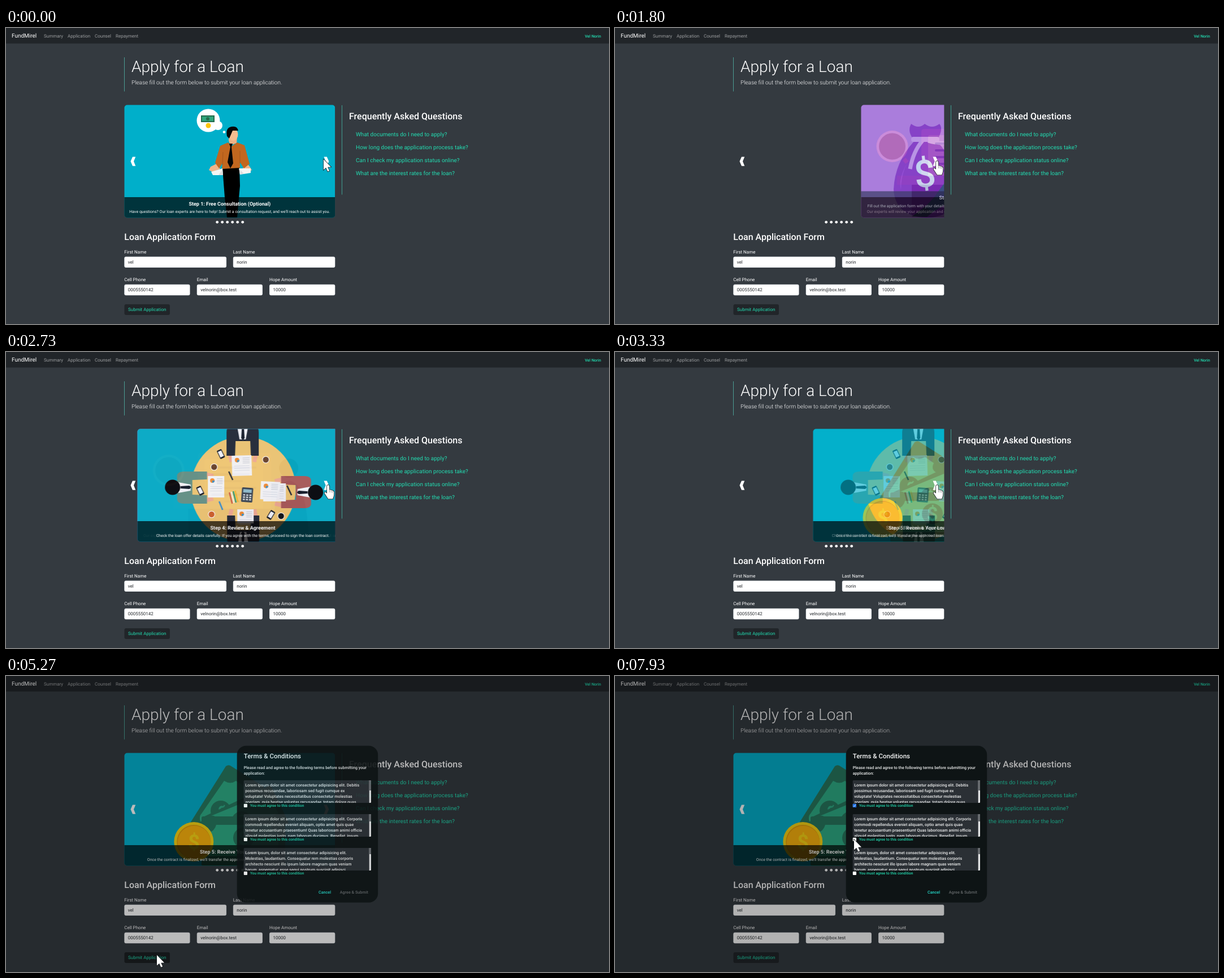
An HTML page with a canvas that plays this animation: 1067x525 px, repeating every 8 s.

```html
<!DOCTYPE html>
<html lang="en">
<head>
<meta charset="utf-8">
<title>Loan application</title>
<style>
html, body { margin: 0; width: 100%; height: 100%; overflow: hidden; background: #343a40; }
canvas { display: block; }
</style>
</head>
<body>
<canvas id="stage" width="1067" height="525"></canvas>
<script>
const W = 1067, H = 525, LOOP = 8000;
const TEAL = '#23dcb1', DARK = '#212529';
const SLIDE = { x: 209.5, y: 136.5, w: 372.8, h: 200, mid: 395.8 };
const screen = document.getElementById('stage').getContext('2d');
let g = screen;

// Drawing helpers, all on the current context g
function text(s, x, y, size, color = '#fff', weight = 400, align = 'left') {
  g.font = `${weight} ${size}px Roboto, sans-serif`;
  g.textAlign = align;
  g.fillStyle = color;
  g.fillText(s, x, y);
}
function box(color, x, y, w, h, r = 0) {
  g.fillStyle = color;
  g.beginPath();
  g.roundRect(x, y, w, h, r);
  g.fill();
}
function disc(color, x, y, r, ry = r) {
  g.fillStyle = color;
  g.beginPath();
  g.ellipse(x, y, r, ry, 0, 0, Math.PI * 2);
  g.fill();
}
function shape(color, d) {
  g.fillStyle = color;
  g.fill(new Path2D(d));
}
function stroke(color, width, d) {
  g.strokeStyle = color;
  g.lineWidth = width;
  g.stroke(new Path2D(d));
}
function at(x, y, turn, draw) {
  g.save();
  g.translate(x, y);
  g.rotate(turn);
  draw();
  g.restore();
}
function layer(draw) {
  const c = document.createElement('canvas');
  c.width = W;
  c.height = H;
  g = c.getContext('2d');
  g.textRendering = 'geometricPrecision';
  draw();
  g = screen;
  return c;
}

function field(label, value, x, y, w) {
  text(label, x, y, 8);
  box('#ced4da', x, y + 5.5, w, 19.5, 3);
  box('#fff', x + .5, y + 6, w - 1, 18.5, 2.5);
  text(value, x + 6.5, y + 18, 8, DARK);
}

function drawPage() {
  box('#343a40', 0, 0, W, H);
  box(DARK, 0, 0, W, 27.5);
  text('FundMirel', 10, 17, 10);
  [['Summary', 67], ['Application', 109], ['Counsel', 157], ['Repayment', 194]]
    .forEach(([s, x]) => text(s, x, 16.5, 8, '#9b9d9f'));
  text('Vel Norin', 1053, 16.5, 7, TEAL, 500, 'right');

  box('#4b9d92', 209, 52, 1, 60.5);
  text('Apply for a Loan', 222, 78.3, 28, '#fff', 300);
  text('Please fill out the form below to submit your loan application.', 222, 100, 10, '#fff', 300);

  box('#3f9d8f', 594, 137, 1, 158.5);
  text('Frequently Asked Questions', 607, 161.5, 16, '#fff', 500);
  ['What documents do I need to apply?', 'How long does the application process take?',
    'Can I check my application status online?', 'What are the interest rates for the loan?']
    .forEach((s, i) => text(s, 619, 192.3 + i * 22.95, 10, TEAL));

  for (let i = 0; i < 6; i++) disc('#fff', 373.7 + i * 9, 344.3, 2.4);
  text('Loan Application Form', 209.3, 375.5, 16, '#fff', 500);
  field('First Name', 'vel', 209.3, 400, 180.8);
  field('Last Name', 'norin', 401.8, 400, 180.6);
  field('Cell Phone', '0005550142', 209.3, 449.2, 116.3);
  field('Email', 'velnorin@box.test', 337.7, 449.2, 116.3);
  field('Hope Amount', '10000', 466, 449.2, 116.4);
}

function drawButton(hover) {
  box(hover ? '#1b1f22' : DARK, 209.5, 490, 80.5, 19, 3);
  text('Submit Application', 216, 502.2, 8, TEAL);
}

function consultation() {
  box('#00afca', 209, 136, 374, 201);
  disc('#fff', 358, 164, 20.5);
  disc('#fff', 375, 173, 8);
  disc('#fff', 386, 184.5, 2.3);
  box('#256b4c', 345, 155, 24, 12);
  box('#2fa67c', 347, 157, 20, 8);
  disc('#256b4c', 357, 161, 3);
  disc('#ffc40c', 358, 173, 4.5);
  shape('#000', 'M383 248L413 248L414 280L409 336L391 336L387 300Z');
  shape('#eeb184', 'M394 186L410 184L408 204L397 208L394 200Z');
  disc('#f4bd90', 402, 189, 8.5, 11);
  shape('#050505', 'M391 192Q388 177 399 175Q409 173 411 182L401 182L395 196Z');
  shape('#f0b488', 'M374 240L379 250L365 255L359 252L362 246Z M425 238L419 249L430 255L435 252L432 247Z');
  shape('#c2671f', 'M393 203L379 209L370 239L377 249L383 240L382 250L414 248L414 238L421 249L431 241L422 208L409 203L399 210Z');
  stroke('#98501b', .7, 'M384 220L383 243M414 218L414 240');
  shape('#050505', 'M395 205L401 205L399 211L402 240L397 249L392 238L397 211Z');
  shape('#f5f5f3', 'M383 249L363 255L366 261L384 261Z M412 249L433 249L433 257L414 260Z');
  shape('#dedede', 'M383 251L384 261L376 261Z M413 251L414 260L421 258Z');
}

function application() {
  box('#bc68c6', 209, 136, 374, 201);
  for (let i = 0; i < 4; i++) {
    box(i % 2 ? '#3f5590' : '#5668a8', 430 - i * 6, 153 + i * 43, 160, 38, 16);
    box('#9fa6cc', 450 - i * 6, 167 + i * 43, 140, 9, 4);
  }
  shape('#8008a4', 'M298 170Q311 180 322 170Q335 180 348 170Q356 180 343 200Q381 242 382 287Q380 334 325 337Q269 333 267 286Q269 238 304 200Q290 184 298 170Z');
  shape('#981cba', 'M309 213Q280 245 280 287Q272 260 309 213Z');
  box('#d48ed4', 298, 193, 50, 9, 4);
  stroke('#d48ed4', 7, 'M318 200Q302 218 296 250M328 200Q343 205 362 204');
  at(322, 258, -.12, () => text('$', 0, 24, 67, '#e2f3e6', 500, 'center'));
  for (let i = 0; i < 7; i++) box(i % 2 ? '#dccb46' : '#b8aa3a', 376 + i % 2, 263 + i * 11, 48, 10, 4);
  shape('#20405a', 'M424 247L374 251L338 301L322 318L336 327L360 311L385 279L428 274Z');
  shape('#141c28', 'M322 317L337 326L326 335L300 334Z');
  shape('#d8b8b4', 'M377 203L400 198L418 213L420 253L382 254Z');
  shape('#2a3350', 'M392 201L398 204L400 237L394 247L388 235Z');
  stroke('#dc9c84', 7, 'M379 207L362 194L365 180M413 210L429 231');
  disc('#dc9c84', 390, 181, 10, 13);
  shape('#4a2030', 'M376 181Q372 163 390 161Q407 161 402 184L395 174Z');
  shape('#e8c45c', 'M382 203L401 152L407 154L388 206Z');
  shape('#283548', 'M401 152L406 143L407 154Z');
}

function review() {
  box('#8f9eff', 209, 136, 374, 201);
  box('#b9a8ff', 316, 179, 130, 112, 5);
  box('#dcd2fb', 328, 190, 104, 92, 3);
  for (let i = 0; i < 6; i++) box('#8a86d8', 340, 203 + i * 12, 80 - i % 3 * 12, 4, 2);
  box('#a79cf5', 273, 262, 90, 16);
  box('#6b63c8', 299, 278, 150, 59);
  shape('#c8a0ee', 'M288 230L294 236L288 241L283 235Z');
  disc('#e2c4fa', 264.5, 210, 28);
  disc('#a070a8', 264.5, 210, 23.5);
  disc('#46397c', 477, 206, 17);
  shape('#5448b0', 'M450 337Q448 232 477 228Q511 231 512 337Z');
}

function sheet(x, y, w, h, turn = 0) {
  at(x, y, turn, () => {
    box('#f3f3f2', 0, 0, w, h);
    disc('#f08a2c', w * .27, 8, 4);
    shape('#3792c8', `M${w * .27} 8l4 0a4 4 0 0 1 -4 4Z`);
    for (let i = 0; i < 4; i++) box('#c7cbd0', w * .55, 4 + i * 3, w * .35, 1);
    for (let i = 0; i < 3; i++) box('#d8dce0', 4, 18 + i * 4, w - 8, 1);
  });
}
function phone(x, y, turn) {
  at(x, y, turn, () => {
    box('#14181d', -4.5, -8, 9, 16, 1.5);
    box('#f3f5f7', -3.3, -5.7, 6.6, 11);
  });
}
function cup(x, y, color) {
  disc('#fff', x, y, 6.3);
  disc(color, x, y, 5.2);
}
// A seated person seen from above, facing along +x
function sitter(x, y, turn, suit) {
  at(x, y, turn, () => {
    stroke('#f0a98c', 7, 'M59 -23L72 -20M59 23L72 20');
    shape(suit, 'M8 -22Q10 -28 20 -28L61 -28L61 -14L35 -13L35 13L61 14L61 29L20 29Q9 29 8 22Z');
    shape('#f6f6f6', 'M10 -9L32 -5L32 6L10 10Z');
    shape('#121820', 'M14 -2L30 -3L33 0L30 3L14 2Z');
    disc('#050505', 0, 0, 13.5);
  });
}
function agreement() {
  box('#05acc3', 209, 136, 374, 201);
  disc('#f1c76d', 396.5, 243, 93);
  sitter(396, 123, Math.PI / 2, '#222831');
  sitter(271.5, 240, 0, '#64917f');
  sitter(524.5, 249, Math.PI, '#aa5953');
  sitter(396, 351, -Math.PI / 2, '#222831');
  sheet(376, 184, 35, 36, -.03);
  sheet(334, 220, 29, 38);
  sheet(432, 233, 40, 32);
  sheet(428, 229, 34, 32, .05);
  sheet(386, 279, 29, 25);
  phone(357, 181, -.45);
  phone(320.5, 246, -.45);
  phone(445.5, 289, .55);
  cup(345, 204, '#674024');
  cup(436.5, 191, '#674024');
  cup(340.5, 288, '#d16125');
  cup(463.5, 291, '#10120f');
  at(403.5, 253.5, .08, () => {
    box('#37434d', -10, -13, 20, 26, 2);
    box('#8ab8c7', -7.5, -10, 15, 6);
    for (let i = 0; i < 9; i++) box('#d1d8da', -7 + i % 3 * 5.5, -1 + Math.floor(i / 3) * 4, 3.5, 2.5);
  });
  ['#cc563e', '#f0f0e8', '#23996c', '#f0b629'].forEach((c, i) =>
    stroke(c, 2.3, `M${372 + i * 3.4} ${249 - i}l5 20`));
  stroke('#202830', 2.5, 'M371 212L378 227M474 237L482 254');
  stroke('#318ccb', 2.5, 'M354 265L360 280');
}

function receive() {
  const deep = '#287a60', pale = '#2fb088';
  box('#04b3d0', 209, 136, 374, 201);
  shape(deep, 'M389 160Q393 157 397 159L457 197L408 285L322 267Z');
  shape(pale, 'M386 186Q397 193 407 186L423 197Q416 210 432 216L392 270L344 258Q341 249 346 244Z');
  disc(deep, 380, 239, 18);
  at(380, 240, .5, () => text('$', 0, 10, 28, pale, 700, 'center'));
  shape(deep, 'M463 196Q467 193 470 197L499 258Q501 261 496 263L343 263L349 250Z');
  shape(pale, 'M453 211Q457 220 468 216L482 244Q473 245 472 251L371 251Q369 247 363 248Z');
  disc(deep, 417, 258, 18);
  text('$', 417, 264, 25, pale, 700, 'center');
  box(deep, 346, 249, 148, 88, 3);
  shape(pale, 'M372 264L469 264Q470 275 482 278L482 319L357 319L357 278Q369 276 372 264Z');
  disc(deep, 420.5, 287, 18.5);
  text('$', 420.5, 299, 34, pale, 700, 'center');
  disc('#fbd716', 332.3, 294, 35);
  disc('#e6a00c', 332.3, 294, 30);
  disc('#ffb50e', 333, 295, 29.2);
  text('$', 332.5, 307, 36, '#fbd716', 700, 'center');
}

function makeSlide(art, title, lines) {
  return layer(() => {
    g.beginPath();
    g.roundRect(SLIDE.x, SLIDE.y, SLIDE.w, SLIDE.h, 5);
    g.clip();
    art();
    const lift = (lines.length - 1) * 10.5;
    box('rgba(0,0,0,.7)', 209, 300 - lift, 374, 40 + lift);
    text(title, SLIDE.mid, 314.5 - lift, 9, '#fff', 700, 'center');
    lines.forEach((s, i) => text(s, SLIDE.mid, 328.2 - lift + i * 10.5, 7, '#fff', 400, 'center'));
  });
}

const LOREM = [
  ['Lorem ipsum dolor sit amet consectetur adipisicing elit. Debitis',
    'possimus recusandae, laboriosam sed fugit cumque ex',
    'voluptate! Voluptates necessitatibus consectetur molestias',
    'aperiam, quia beatae voluptas recusandae, totam dolore quas'],
  ['Lorem ipsum dolor sit amet consectetur adipisicing elit. Corporis',
    'commodi repellendus eveniet aliquam, optio amet quis quae',
    'tenetur accusantium praesentium! Quas laboriosam animi officia',
    'aliquid molestias iusto, nam laborum ducimus. Repellat, ipsum'],
  ['Lorem ipsum, dolor sit amet consectetur adipisicing elit.',
    'Molestias, laudantium. Consequatur rem molestias corporis',
    'architecto nesciunt illo ipsum labore magnam quas veniam',
    'harum, aspernatur, esse sequi nostrum suscipit adipisci']
];
const THUMBS = [18, 13, 11];

function drawModal() {
  box('#0e1415', 408.7, 123.8, 249.5, 278, 16);
  text('Terms & Conditions', 420.7, 146, 11.5, '#f4f5f5', 500);
  text('Please read and agree to the following terms before submitting your', 420.7, 164.5, 7.15, '#f0f1f1', 500);
  text('application:', 420.7, 174.5, 7.15, '#f0f1f1', 500);
  LOREM.forEach((lines, i) => {
    const y = 185 + i * 60;
    g.save();
    g.beginPath();
    g.roundRect(420.7, y, 225.3, 40, 1.5);
    g.clip();
    box('#2b3035', 420, y, 227, 41);
    lines.forEach((s, n) => text(s, 423.2, y + 10.7 + n * 10, 7.15, '#f0f1f1', 500));
    box('#e3e5e6', 642.7, y, 4, 41);
    box('#686c70', 642.7, y, 4, THUMBS[i]);
    g.restore();
    box('#fff', 420.8, y + 41.8, 6.2, 6.2, 1);
    text('You must agree to this condition', 432, y + 47.2, 6.6, TEAL, 500);
  });
  text('Cancel', 553, 385.5, 7.2, '#25dccc', 500);
  text('Agree & Submit', 590.7, 385.5, 7.2, '#65696b', 500);
}

const page = layer(drawPage);
const modal = layer(drawModal);
const slides = [
  makeSlide(consultation, 'Step 1: Free Consultation (Optional)',
    ["Have questions? Our loan experts are here to help! Submit a consultation request, and we'll reach out to assist you."]),
  makeSlide(application, 'Step 2: Apply for a Loan',
    ['Fill out the application form with your details and upload the required documents, then press the submit button to', 'get started!']),
  makeSlide(review, 'Step 3: Evaluation',
    ["Our experts will review your application and determine your eligibility. You'll be notified of the result by email soon."]),
  makeSlide(agreement, 'Step 4: Review & Agreement',
    ['Check the loan offer details carefully. If you agree with the terms, proceed to sign the loan contract.']),
  makeSlide(receive, 'Step 5: Receive Your Loan',
    ["Once the contract is finalized, we'll transfer the approved loan amount directly to your account."])
];

const STARTS = [1049, 1655, 2315, 3115], SLIDE_MS = 600;
const PATH = [ // time, x, y of the pointer tip
  [0, 562, 233], [70, 562, 233], [200, 570, 236], [3690, 570, 236], [3800, 545, 268],
  [3870, 472, 341], [3935, 386, 429], [4000, 352, 447], [4200, 300, 478], [4500, 274, 492],
  [4800, 267, 495], [5400, 267, 495], [5870, 506, 293], [6400, 464, 236], [6540, 464, 236],
  [6600, 462, 224], [6740, 462, 224], [7130, 422, 227], [7320, 422, 227], [7930, 423, 290], [8000, 423, 290]
];

const clamp = v => Math.min(1, Math.max(0, v));

// cubic-bezier(.25, .1, .25, 1)
function ease(x) {
  if (x <= 0 || x >= 1) return clamp(x);
  let lo = 0, hi = 1, s = x;
  for (let i = 0; i < 24; i++) {
    s = (lo + hi) / 2;
    if (.75 * s * (1 - s) + s ** 3 < x) lo = s; else hi = s;
  }
  return .3 * (1 - s) ** 2 * s + 3 * (1 - s) * s * s + s ** 3;
}

function pointerAt(t) {
  const i = Math.max(1, PATH.findIndex(k => k[0] >= t));
  const [t0, x0, y0] = PATH[i - 1], [t1, x1, y1] = PATH[i];
  const p = clamp((t - t0) / (t1 - t0));
  return [x0 + (x1 - x0) * p, y0 + (y1 - y0) * p];
}

function drawCarousel(t) {
  const n = STARTS.filter(s => t >= s).length;
  const p = n ? ease((t - STARTS[n - 1]) / SLIDE_MS) : 1;
  const shift = (1 - p) * SLIDE.w;
  g.save();
  g.beginPath();
  g.rect(209, 136, 373.3, 201);
  g.clip();
  if (p < 1) g.drawImage(slides[n - 1], shift, 0);
  g.globalAlpha = p;
  g.drawImage(slides[n], shift, 0);
  g.restore();
  shape('#fff', 'M224 228.5L229.3 228.5L226 236.6L229.3 244.8L224 244.8L220.5 236.6Z');
  shape('#fff', 'M567.8 228.5L562.5 228.5L565.8 236.6L562.5 244.8L567.8 244.8L571.3 236.6Z');
}

const ARROW = 'M0 0L0 18.6L4.2 14.8L7.3 21.6L10.2 20.3L7.2 13.7L13 13.4Z';
const HAND = 'M-2 2Q-2 0 0 0Q2 0 2 2L2.3 9Q4.2 7.4 5.2 9.5Q7.2 8.4 8 10.5Q10.2 10 10.4 12.6L10.2 18Q9.5 21.5 8.2 24.5L.2 24.5Q-2.3 20.5 -6 15Q-7 12.7 -4.8 12.5L-2 14.8Z';

function drawPointer(t) {
  const [x, y] = pointerAt(t);
  const d = t >= 135 && t < 3760 ? HAND : ARROW;
  at(x, y, 0, () => {
    stroke('#16191c', 1.4, d);
    shape('#fff', d);
    if (d === HAND) stroke('#555', .6, 'M2.3 9L2.4 13M5.2 9.5L5.3 13.3M8 10.5L8 13.8');
  });
}

function render(t) {
  g.drawImage(page, 0, 0);
  drawButton(t > 4250 && t < 5500);
  drawCarousel(t);
  const open = clamp((t - 5040) / 260);
  if (open) {
    box(`rgba(0,0,0,${.3 * open})`, 0, 0, W, H);
    g.globalAlpha = open;
    g.drawImage(modal, 0, 0);
    g.globalAlpha = 1;
    if (t >= 7320) {
      box('#1c70e6', 420.8, 226.8, 6.2, 6.2, 1);
      stroke('#fff', .9, 'M422.1 230L423.4 231.3L425.8 228.4');
    }
  }
  drawPointer(t);
}

g.textRendering = 'geometricPrecision';
const began = performance.now();
function tick() {
  render((performance.now() - began) % LOOP);
  requestAnimationFrame(tick);
}
tick();
</script>
</body>
</html>
```
